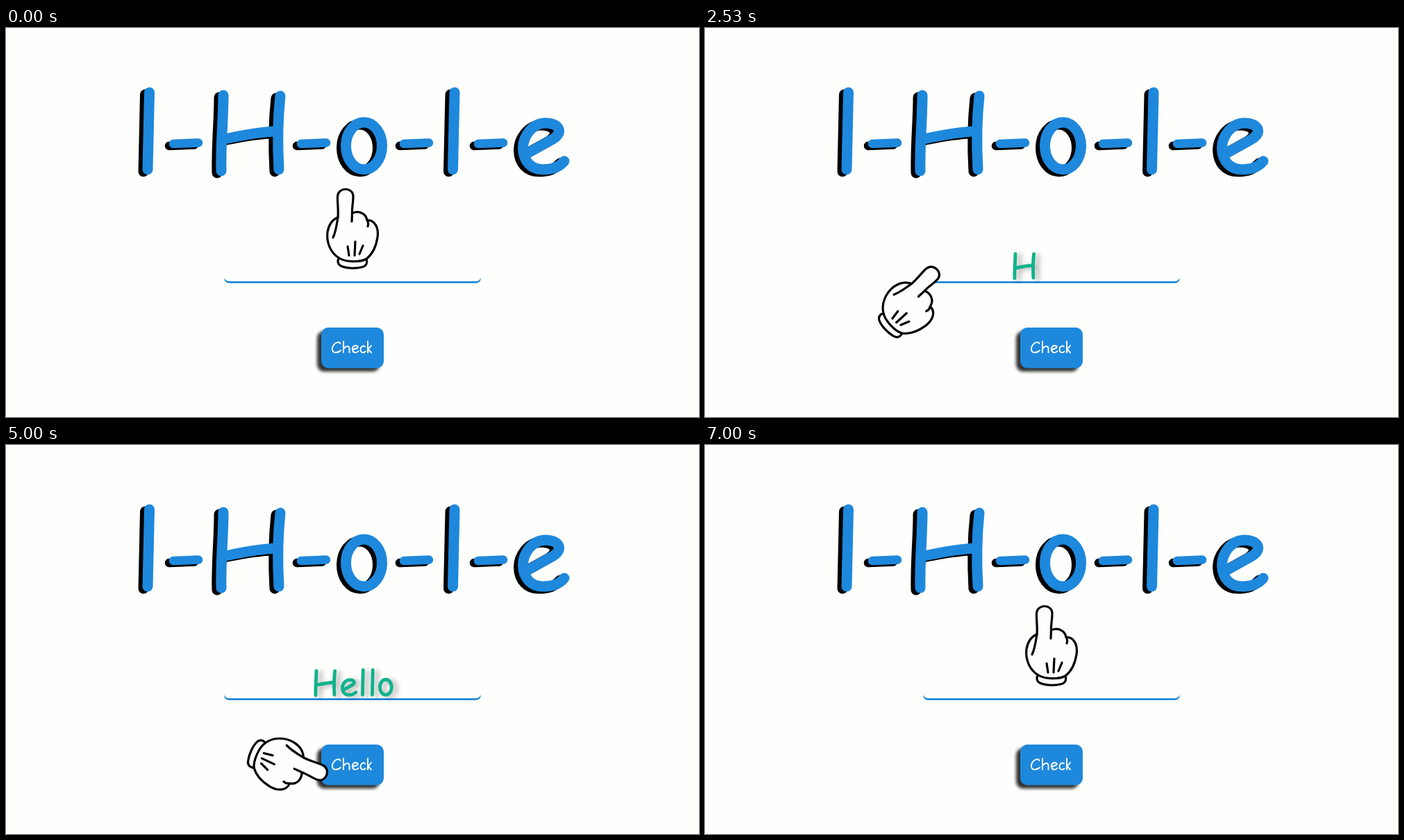
An HTML page with a canvas for the animation above (7500 ms loop, 998 px wide and 561 px high).

```html
<!DOCTYPE html>
<html lang="en">
<head>
<meta charset="utf-8">
<title>Word scramble</title>
<style>
html, body { margin: 0; width: 100%; height: 100%; overflow: hidden; background: #fefefd; }
canvas { display: block; }
</style>
</head>
<body>
<canvas id="stage" width="998" height="561" role="img" aria-label="l-H-o-l-e, Hello, Check"></canvas>
<script>
const ctx = document.getElementById('stage').getContext('2d');
const LOOP = 7500, FPS = 0.03;
const PAPER = '#fefefd', BLUE = '#1e88dc', GREEN = '#10b28c';

// Pen strokes: x from the left edge, y from the baseline
const glyphs = {
  'l': new Path2D('M10,-119 L7.5,-8'),
  '-': new Path2D('M7,-45 L43,-46.5'),
  'H': new Path2D('M10.5,-115 C10.5,-82 6.5,-42 7.5,-6 M92.5,-114 C89,-82 88.5,-42 90.5,-8 M12.5,-52 C33,-56 58,-62 87,-63'),
  'o': new Path2D('M34,-76 A26,34 0 1 0 33,-8 A26,34 0 1 0 34,-76'),
  'e': new Path2D('M15,-32 L51,-52 C67,-62 59,-75 39,-75 C20,-74 7.5,-55 7.5,-39 C8,-19 20,-8 36,-8 C51,-8 59,-11 67,-20')
};
const title = { text: 'l-H-o-l-e', x: [196.5, 234, 302.5, 418, 482, 566, 636, 673, 737] };
const answer = { text: 'Hello', x: [443.5, 482, 511, 525, 536] };

const label = new Path2D(
  'M481.5,455 C480,452 475,453 472,457 C468,463 470,468 475,468 C478,468 480,467 482,465' +
  'M486,452 L486,468 M486,463 C488,459 494,457 494.5,462 L494.5,468' +
  'M499.5,464 L506,461.5 C508,459 505,458 503,458 C499.5,459 498.5,462 499,464.5 C500,469 505,469 507.5,466' +
  'M517,459.5 C514,457 510.5,460 510.5,464 C511,469 515,469 517.5,466.5' +
  'M521,452 L521,468 M526,458 L521.5,463.5 L526,468');
const underline = new Path2D(
  'M314,360 Q314.5,368 322,368 L676,368 Q683.5,368 684,360 Q682,365.3 676,365.3 L322,365.3 Q316,365.3 314,360Z');
const handShape = new Path2D(
  'M478,273 C479,262 477,250 477.5,243 C478,229 500,229 500,243 C500,252 498,260 498.5,267 ' +
  'C508,263 518,267 520,277 C532,277 537,289 535,302 C533,315 528,326 519,333 ' +
  'C521,340 518,344 512,345 C504,347 490,347 482,343 C477,340 477,334 480,332 ' +
  'C468,325 461,310 463,294 C465,283 471,276 478,273Z');
const handLines = new Path2D(
  'M478,273 C476,285 475,294 471,302 M498.5,267 L498,279 M520,277 C522,280 522,283 521,286 ' +
  'M480,332 C490,338 510,338 519,333 M492,315 L494,328 M503,308 L502,328 M514,314 L509,326');

// Hand pose at each key time: [ms, x, y, degrees]
const poses = [
  [0, 499, 289, 0], [1000, 499, 289, 0], [2000, 301, 395, 45],
  [4000, 301, 395, 45], [5000, 405.5, 464, 112.5], [6000, 405.5, 464, 112.5],
  [7000, 499, 289, 0], [LOOP, 499, 289, 0]
];

const clamp = v => Math.min(1, Math.max(0, v));
const ease = u => u < 0.5 ? 2 * u * u : 1 - 2 * (1 - u) * (1 - u);

function pose(t) {
  const i = Math.max(1, poses.findIndex(p => p[0] > t));
  const a = poses[i - 1], b = poses[i];
  const k = ease(clamp((t - a[0]) / (b[0] - a[0])));
  return [1, 2, 3].map(n => a[n] + (b[n] - a[n]) * k);
}

function drawGlyph(char, x, y, scale, color) {
  ctx.save();
  ctx.translate(x, y);
  ctx.scale(scale, scale);
  ctx.lineWidth = char === '-' ? 12.5 : 15;
  ctx.strokeStyle = color;
  ctx.stroke(glyphs[char]);
  ctx.restore();
}

function drawTitle() {
  const pass = (dx, dy, color) =>
    [...title.text].forEach((c, i) => drawGlyph(c, title.x[i] + dx, 212 + dy, 1, color));
  pass(-6, 3, '#000');
  pass(0, 0, BLUE);
}

function setShadow(color, dx, dy, blur) {
  ctx.shadowColor = color;
  ctx.shadowOffsetX = dx;
  ctx.shadowOffsetY = dy;
  ctx.shadowBlur = blur;
}

function drawButton() {
  ctx.save();
  setShadow('rgba(0,0,0,0.8)', -6, 5, 4);
  ctx.fillStyle = BLUE;
  ctx.beginPath();
  ctx.roundRect(454, 432, 90, 58.5, 10);
  ctx.fill();
  ctx.restore();
  ctx.strokeStyle = '#fff';
  ctx.lineWidth = 1.9;
  ctx.stroke(label);
}

// Letters pop in one by one, then drift right and fade, last letter first
function drawAnswer(t) {
  const end = 6633;
  ctx.save();
  setShadow('rgba(0,0,0,0.3)', 6, 2, 7);
  [...answer.text].forEach((c, i) => {
    if (t < 2530 + 192 * i || t >= end) return;
    const start = 5833 + 77 * (4 - i);
    const k = ease(clamp((t - start) / (end - start)));
    ctx.globalAlpha = 1 - k;
    drawGlyph(c, answer.x[i] + 108 * k, 363, 0.325, GREEN);
  });
  ctx.restore();
}

function drawHand(t) {
  const [x, y, deg] = pose(t);
  ctx.save();
  ctx.translate(x, y);
  ctx.rotate(deg * Math.PI / 180);
  ctx.translate(-499, -289);
  ctx.fillStyle = PAPER;
  ctx.fill(handShape);
  ctx.strokeStyle = '#000';
  ctx.lineWidth = 3.2;
  ctx.stroke(handShape);
  ctx.stroke(handLines);
  ctx.restore();
}

function draw(now) {
  const t = Math.floor((now % LOOP + 8) * FPS) / FPS % LOOP;
  ctx.fillStyle = PAPER;
  ctx.fillRect(0, 0, 998, 561);
  ctx.lineCap = ctx.lineJoin = 'round';
  drawTitle();
  ctx.fillStyle = BLUE;
  ctx.fill(underline);
  drawButton();
  drawAnswer(t);
  drawHand(t);
}

const begin = performance.now();
function tick() {
  draw(performance.now() - begin);
  requestAnimationFrame(tick);
}
tick();
</script>
</body>
</html>
```
